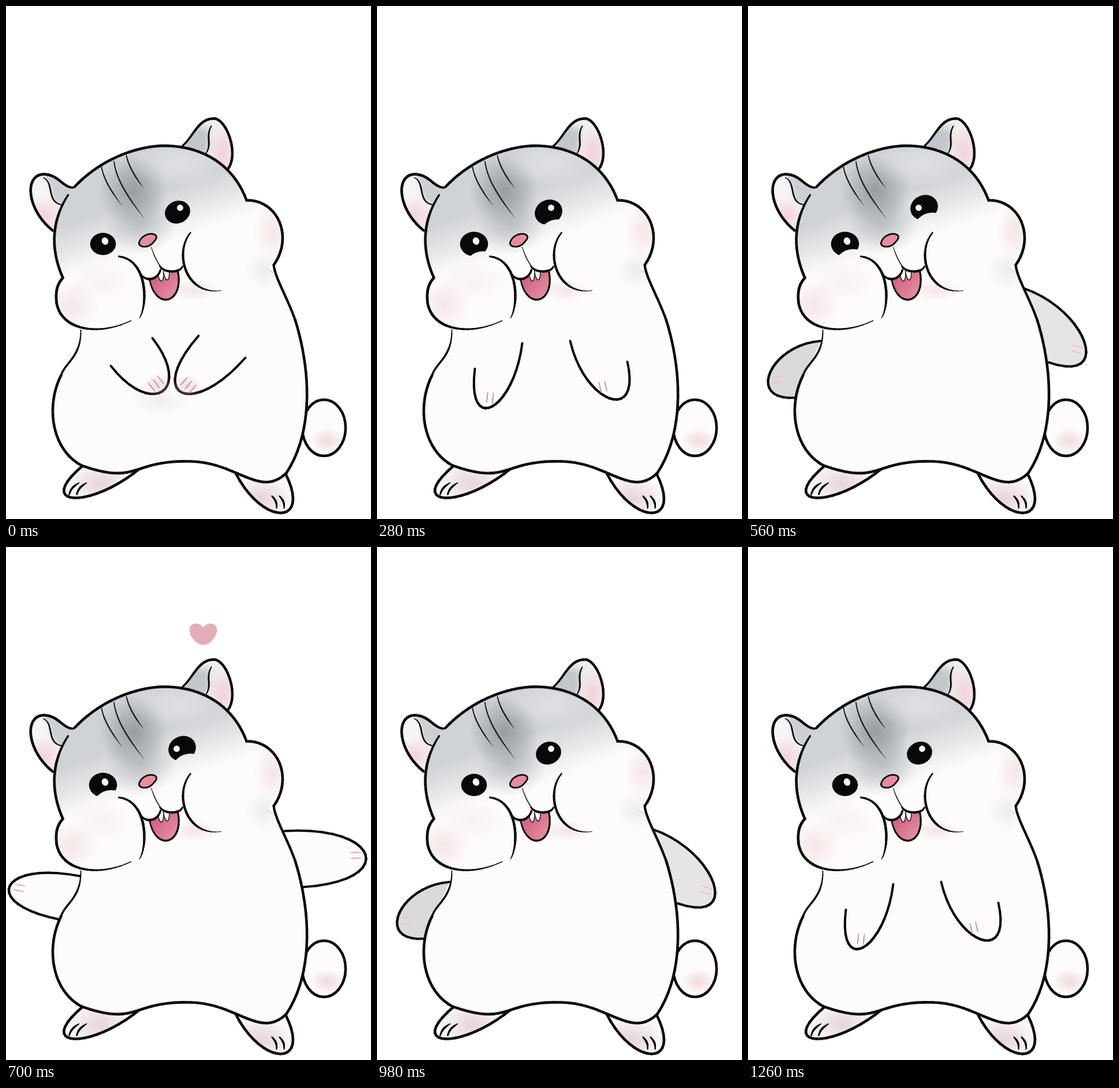
An HTML page with a canvas for the animation above (1400 ms loop, 632 by 886 pixels).

```html
<!DOCTYPE html>
<html lang="en">
<head>
<meta charset="utf-8">
<title>Hamster dance</title>
<style>
html, body { margin: 0; width: 100%; height: 100%; overflow: hidden; background: #fff; }
canvas { display: block; }
</style>
</head>
<body>
<canvas id="stage" width="632" height="886"></canvas>
<script>
const ctx = document.getElementById('stage').getContext('2d');
const STEP = 140;
const INK = '#0b0b0c', FUR = '#fdfcfa', ROSE = '#c9a0a8', PINK = '#f4bfca', HEART = '#e4aeb8';
const GREY = '150,156,162', BLUSH = '232,196,203';

// Chain of cubic Bezier curves, sampled: start, then two handles and an end for each piece.
function bez(...n) {
  const out = [[n[0], n[1]]];
  for (let i = 0; i + 7 < n.length; i += 6) {
    for (let k = 1; k <= 20; k++) {
      const t = k / 20, u = 1 - t;
      out.push([0, 1].map(j => u * u * u * n[i + j] + 3 * u * u * t * n[i + 2 + j] +
        3 * u * t * t * n[i + 4 + j] + t * t * t * n[i + 6 + j]));
    }
  }
  return out;
}

// Rounded limb that leaves the body at a, turns at the tip and returns at b.
function limb(ax, ay, tx, ty, bx, by) {
  const vx = (tx - (ax + bx) / 2) / 0.75, vy = (ty - (ay + by) / 2) / 0.75;
  const pts = bez(ax, ay, ax + vx, ay + vy, bx + vx, by + vy, bx, by);
  pts.axis = Math.atan2(vy, vx);
  return pts;
}

function trace(pts) {
  ctx.beginPath();
  pts.forEach(p => ctx.lineTo(...p));
  ctx.closePath();
}

function fill(pts, color) {
  trace(pts);
  ctx.fillStyle = color;
  ctx.fill();
}

// Brush line; `start` and `end` scale the width at its two ends.
function ink(pts, w = 4.6, start = 1, end = 1, color = INK) {
  ctx.strokeStyle = color;
  ctx.lineCap = 'round';
  const n = pts.length - 1;
  for (let i = 0; i < n; i++) {
    const t = (i + 0.5) / n;
    ctx.lineWidth = w * Math.min(1, start + (1 - start) * t * 3, end + (1 - end) * (1 - t) * 3);
    ctx.beginPath();
    ctx.moveTo(...pts[i]);
    ctx.lineTo(...pts[i + 1]);
    ctx.stroke();
  }
}

function soft(x, y, rx, ry, rgb, alpha) {
  ctx.save();
  ctx.translate(x, y);
  ctx.scale(rx, ry);
  const g = ctx.createRadialGradient(0, 0, 0, 0, 0, 1);
  [1, 0.55, 0].forEach((k, i) => g.addColorStop(i / 2, `rgba(${rgb},${alpha * k})`));
  ctx.fillStyle = g;
  ctx.fillRect(-1, -1, 2, 2);
  ctx.restore();
}

function within(pts, paint) {
  ctx.save();
  trace(pts);
  ctx.clip();
  paint();
  ctx.restore();
}

function blurred(pts, color, r) {
  ctx.filter = `blur(${r}px)`;
  fill(pts, color);
  ctx.filter = 'none';
}

function oval(x, y, rx, ry, turn, color) {
  ctx.beginPath();
  ctx.ellipse(x, y, rx, ry, turn, 0, 7);
  ctx.fillStyle = color;
  ctx.fill();
}

const crown = bez(118,312, 165,262, 232,239, 280,241, 342,243, 394,275, 416,335);
const cheekR = bez(416,335, 470,334, 498,398, 463,447);
const sideR = bez(463,447, 466,470, 485,500, 500,541);
const hipR = bez(500,541, 525,620, 535,730, 485,806);
const bottom = bez(485,806, 440,850, 400,788, 320,786, 215,783, 230,828, 130,793);
const hipL = bez(130,793, 78,765, 68,690, 95,637);
const sideL = bez(95,637, 102,615, 130,605, 129,559);
const cheekL = bez(216,543, 160,570, 95,560, 87,512, 85,492, 88,480, 98,469);
const templeL = bez(98,469, 76,420, 78,370, 107,326);
const body = [crown, cheekR, sideR, hipR, bottom, hipL, sideL, cheekL, templeL].flat();

const earL = bez(120,313, 98,316, 92,290, 64,290, 30,292, 36,352, 80,387);
const earR = bez(303,243, 325,225, 332,192, 362,194, 385,200, 404,262, 381,284);
const foldL = bez(64,296, 84,304, 68,340, 98,343);
const foldR = bez(355,207, 344,225, 358,240, 344,256);
const footL = limb(133,793, 118,849, 233,797);
const footR = limb(397,806, 475,875, 483,806);
const tongue = limb(248,472, 281,506, 297,457);
const nose = bez(230,408, 236,387, 272,390, 256,406, 246,420, 228,416, 230,408);

// `claw` tells how far along the limb the fingers sit; filled arms go behind the body.
const ARMS = {
  clasped: { left: limb(181,621, 270,665, 253,573), right: limb(333,569, 304,667, 414,607), claw: 0.5, fingers: 3 },
  bent: { left: limb(180,621, 246,673, 255,573), right: limb(330,571, 328,672, 412,592), claw: 0.4, tint: PINK },
  low: { left: limb(169,626, 199,691, 251,582), right: limb(334,578, 402,677, 433,614), claw: 0.45 },
  hips: { left: limb(164,618, 134,697, 225,647), right: limb(443,573, 463,688, 386,643), claw: 0.5 },
  back: { left: limb(125,578, 38,632, 82,676), right: limb(477,487, 582,580, 520,615), claw: 0.62, tint: PINK,
    fills: ['#dadada', '#e5e5e5'] },
  wide: { left: limb(128,568, 6,585, 93,643), right: limb(482,490, 622,531, 512,587), claw: 0.5, tint: '#e9b0bc',
    fills: [FUR, FUR] },
  raised: { left: limb(92,526, 34,546, 95,638), right: limb(460,456, 554,437, 498,544), claw: 0.4,
    fills: [FUR, FUR], joined: true }
};

// `cut` is the distance from the eye's middle to the cheek that covers it.
const LOOKS = { open: { cut: 30, lift: 0 }, smile: { cut: 17, lift: 0 }, grin: { cut: 15, lift: 0 }, beam: { cut: 11, lift: 8 } };

const POSES = [
  ['clasped', 'open'], ['bent', 'smile'], ['low', 'grin'], ['hips', 'grin'], ['back', 'beam'],
  ['wide', 'beam'], ['raised', 'shut'], ['back', 'open'], ['hips', 'open'], ['low', 'open']
];

function drawLimbs() {
  oval(550, 728, 37.5, 48.5, 0, FUR);
  soft(556, 750, 30, 22, BLUSH, 0.6);
  ctx.beginPath();
  ctx.ellipse(550, 728, 37.5, 48.5, 0, 0, 7);
  ctx.lineWidth = 4.6;
  ctx.strokeStyle = INK;
  ctx.stroke();
  for (const foot of [footL, footR]) {
    const [x, y] = foot[10];
    fill(foot, FUR);
    within(foot, () => soft(x + (foot === footL ? 45 : -35), y - 25, 60, 42, '222,200,205', 0.75));
    ink(foot);
  }
  for (const x of [0, 13]) {
    ink(bez(109 + x,843, 112 + x,832, 118 + x,828, 126 + x,823), 3.4, 0.8, 0.4);
    ink(bez(460 + x,846, 466 + x,852, 469 + x,858, 468 + x,867), 3.4, 0.7, 0.5);
  }
}

function drawEars() {
  fill(earL, '#f6f4f4');
  within(earL, () => {
    blurred([...foldL, [125, 340], [115, 300], [64, 288]], '#cdd0d3', 3);
    soft(66, 362, 34, 34, '240,190,200', 0.6);
  });
  fill(earR, '#f1eff0');
  within(earR, () => {
    blurred([...foldR, [300, 252], [320, 195]], '#c3c7cb', 4);
    soft(373, 252, 26, 46, '240,195,204', 0.65);
    soft(345, 200, 26, 20, '236,237,239', 0.8);
  });
  ink(earL, 4.6, 0.8);
  ink(earR, 4.4, 0.7);
  ink(foldL, 2.6, 0.5, 0.7);
  ink(foldR, 2.8, 0.7, 0.5);
}

function shadeHead() {
  const cap = ctx.createLinearGradient(129, 367, 160, 456);
  cap.addColorStop(0, 'rgba(208,211,214,1)');
  cap.addColorStop(0.5, 'rgba(214,217,220,.62)');
  cap.addColorStop(1, 'rgba(230,232,234,0)');
  ctx.fillStyle = cap;
  ctx.fillRect(60, 220, 440, 300);
  soft(220, 318, 60, 62, '118,122,128', 0.62);
  soft(232, 375, 62, 55, GREY, 0.5);
  soft(300, 272, 85, 40, '236,237,239', 0.5);
  soft(114, 516, 46, 42, BLUSH, 0.4);
  soft(165, 475, 60, 34, BLUSH, 0.2);
  soft(462, 388, 34, 50, BLUSH, 0.4);
  soft(325, 490, 42, 20, BLUSH, 0.4);
  soft(448, 455, 34, 34, GREY, 0.16);
}

function drawBody(joined) {
  fill(body, FUR);
  fill(cheekL, FUR);
  within(body, shadeHead);
  if (!joined) {
    ink(sideR, 4.2);
    ink(sideL, 3.4, 1, 0.5);
  }
  fill([[452, 453], [461, 446], [462, 460]], '#fff');
  ink([[453, 453], [461, 460]], 1, 1, 1, '#aaa');
  [crown, cheekR, hipR, bottom, hipL].forEach(line => ink(line));
  ink(cheekL, 4.6, 0.3);
  ink(templeL, 4.6, 1, 0.7);
}

function drawFace() {
  for (let i = 0; i < 3; i++) {
    const x = 165 + 21.5 * i, y = 278 - 10 * i, len = [65, 97, 55][i];
    ink(bez(x,y, x + 4,y + len * 0.35, x + len * 0.3,y + len * 0.7, x + len * 0.53,y + len), 2.3, 0.8, 0.2, '#1c1d1f');
  }
  const red = ctx.createLinearGradient(255, 465, 295, 500);
  red.addColorStop(0, '#cf5f7c');
  red.addColorStop(1, '#e590a6');
  fill(tongue, red);
  ink(tongue, 3.2, 0.8);
  for (const [x, y] of [[262, 459], [272, 457]]) {
    const tooth = bez(x,y, x + 3,y + 22, x + 12,y + 20, x + 10,y - 2);
    fill(tooth, '#fbfafa');
    ink(tooth, 1.6, 1, 1, '#333');
  }
  const lipL = bez(233,462, 240,476, 262,474, 267,455);
  const lipR = bez(266,449, 275,462, 302,460, 305,449);
  fill([...lipL, ...lipR, [285, 440], [250, 440]], FUR);
  ink(lipL, 4, 0.5, 0.8);
  ink(lipR, 4, 0.7, 0.6);
  ink(bez(251,416, 255,428, 260,440, 267,449), 1.7, 0.6, 1, '#333');
  fill(nose, '#e88c9d');
  ink(nose, 2.6);
  ink(bez(195,432, 245,438, 245,515, 231,538), 4.4, 0.7, 0.3);
  ink(bez(319,391, 290,425, 310,500, 372,491), 4.2, 0.6, 0.2);
}

function drawEye(x, y, turn, cut) {
  const grow = cut < 30 ? 2 : 0, reach = cut + 34;
  ctx.save();
  ctx.beginPath();
  ctx.rect(0, 0, 632, 886);
  ctx.arc(x + reach * 0.32, y + reach * 0.95, 34, 0, 7);
  ctx.clip('evenodd');
  oval(x, y, 22.3 + grow, 19.2 + grow, turn, '#080808');
  ctx.restore();
}

function drawEyes(name) {
  if (name === 'shut') {
    ink(bez(145,420, 155,409, 170,403, 187,404), 3.4, 0.5, 0.7);
    ink(bez(147,437, 150,420, 165,408, 187,405), 3.2, 0.5, 0.7);
    ink(bez(288,356, 297,341, 308,334, 322,332), 3.4, 0.8, 0.5);
    ink(bez(289,355, 304,345, 322,342, 340,343), 3.2, 0.8, 0.5);
    return;
  }
  const { cut, lift } = LOOKS[name];
  drawEye(167.5, 410.5, 0, cut);
  drawEye(296.5 + lift, 355.5 - lift, -0.4, cut);
  oval(171, 405.5, 5.6, 6.6, -0.4, '#f6f6f6');
  oval(301 - lift * 0.75, 348, 5.4, 5.4, 0, '#f6f6f6');
}

function drawArm(arm, pose, color) {
  if (color) fill(pose.joined ? [...arm, [300, 570]] : arm, color);
  ink(arm, 4.4, 0.9, 0.9);
  const [x, y] = arm[Math.round(pose.claw * 20)];
  const dx = Math.cos(arm.axis), dy = Math.sin(arm.axis);
  const n = pose.fingers || 2;
  if (n === 3) soft(x - dx * 14, y - dy * 14, 26, 20, BLUSH, 0.55);
  for (let i = 0; i < n; i++) {
    const side = (i - (n - 1) / 2) * 10;
    const at = d => [x - dx * d - dy * side, y - dy * d + dx * side];
    ink(bez(...at(8), ...at(13), ...at(20), ...at(26)), 2, 0.7, 0.7, pose.tint || ROSE);
  }
}

function drawArms(pose) {
  [pose.left, pose.right].forEach((arm, i) => drawArm(arm, pose, pose.fills && pose.fills[i]));
}

function heart(x, y, size, turn) {
  const half = bez(0,-0.25, 0.12,-0.48, 0.5,-0.44, 0.5,-0.18, 0.5,0.05, 0.25,0.37, 0,0.37);
  const mirror = half.map(([a, b]) => [-a, b]).reverse();
  ctx.save();
  ctx.translate(x, y);
  ctx.rotate(turn);
  ctx.scale(size, size);
  fill([...half, ...mirror], HEART);
  ctx.restore();
}

function draw(step) {
  const [name, look] = POSES[step];
  const pose = ARMS[name];
  ctx.fillStyle = '#fff';
  ctx.fillRect(0, 0, 632, 886);
  ctx.save();
  ctx.translate(0.5, 0.5);
  if (pose.joined) ctx.translate(1, 1);
  if (pose.fills) drawArms(pose);
  drawLimbs();
  drawEars();
  drawBody(pose.joined);
  drawFace();
  drawEyes(look);
  if (name === 'clasped') soft(265, 682, 50, 24, GREY, 0.14);
  if (!pose.fills) drawArms(pose);
  if (name === 'wide') heart(341, 151, 48, 0);
  if (name === 'raised') {
    heart(301, 65, 96, -0.46);
    heart(337, 149, 49, -0.5);
  }
  ctx.restore();
}

let shown = -1;
function tick() {
  const step = Math.floor(performance.now() / STEP) % POSES.length;
  if (step !== shown) draw(shown = step);
  requestAnimationFrame(tick);
}
tick();
</script>
</body>
</html>
```
